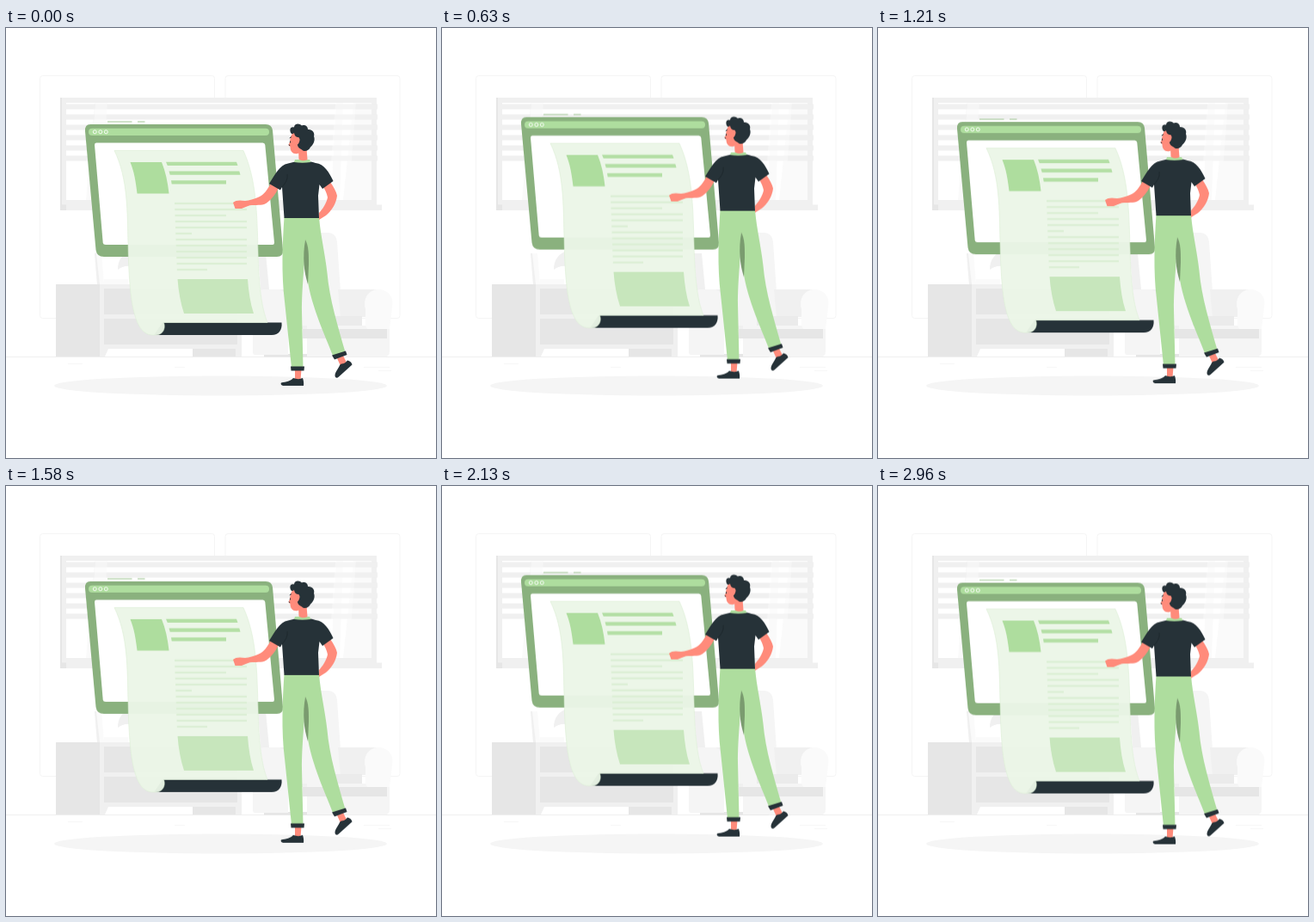
Animation of 500 by 500 pixels, one loop 3 s. Source, as an HTML page:

```html
<!DOCTYPE html>
<html lang="en">
<head>
<meta charset="utf-8">
<title>Reading a long page</title>
<style>
  html, body { margin: 0; width: 100%; height: 100%; overflow: hidden; background: #fff; }
  svg { display: block; width: 100vw; height: 100vh; }

  /* Linear bob, drawn at 24 pictures per second */
  .float { animation: bob 1500ms -4ms infinite; }
  @keyframes bob {
    0%   { transform: translateY(.5px); animation-timing-function: steps(18, start); }
    50%  { transform: translateY(-9.5px); animation-timing-function: steps(18, start); }
    100% { transform: translateY(.5px); }
  }

  .g1 { fill: #fafafa; }
  .g2 { fill: #f5f5f5; }
  .g3 { fill: #f0f0f0; }
  .g4 { fill: #e6e6e6; }
  .white { fill: #fff; }
  .green { fill: #aedd9e; }
  .title { fill: #b4dfa5; }
  .deep { fill: #8ab17e; }
  .shade { fill: #7a9b6f; }
  .ink { fill: #263238; }
  .skin { fill: #ff8b7b; }
  .line { fill: none; stroke: #f5f5f5; }
</style>
</head>
<body>
<svg viewBox="0 0 500 500">
  <!-- wall -->
  <g class="line">
    <rect x="39.5" y="55.5" width="203" height="282" rx="3"/>
    <rect x="255" y="55.5" width="203" height="282" rx="3"/>
  </g>

  <!-- window -->
  <g>
    <path class="white" d="M63 81H431V212H63Z"/>
    <path class="g1" d="M103 87H118L108 200H93ZM384 87H392L388 200H378ZM404 87H425V200H392Z"/>
    <path class="g3" d="M63 81H431V87H63ZM65 87H70V206H65ZM425 87H431V206H425ZM70 200H425V206H70ZM63 205.5H437V212H63Z"/>
    <path class="g4" d="M63 81H65V206H63ZM63 205.5H70V212H63Z"/>
    <g id="slats" class="g3"></g>
    <path d="M104 87H118L113 155H99ZM383 87H407L402 155H378Z" fill="#fff" opacity=".3"/>
  </g>

  <!-- floor -->
  <path d="M0 382.5H500" stroke="#ebebeb" stroke-width=".8"/>
  <path d="M72 390.5H89M196 394.5H208M416 394.5H446M433 398.5H448" stroke="#f5f5f5" stroke-width=".8"/>

  <!-- cabinet -->
  <g>
    <path class="g1" d="M103 262H111L114 298H106ZM114 292H142V298H114Z"/>
    <path class="g3" d="M103 262H105L109 298H106ZM130 281C130 269 136 262 146 259V277C139 276 134 278 130 281ZM293 262H302L306 304H296Z"/>
    <path class="g3" d="M109 298H274V382H109Z"/>
    <path class="g4" d="M58 298H109V382H58ZM114 303H269V333H114ZM114 338H269V368H114ZM217 373H267V382H217Z"/>
    <path class="white" d="M119 373H217V382H115Z"/>
  </g>

  <!-- armchair -->
  <g>
    <path class="g3" d="M296 304H350V350H296Z"/>
    <path class="g2" d="M346 238H374C381 238 384 242 385 249L391 335V346H340V250Z"/>
    <path class="g4" d="M300 379H380V382.5H300Z"/>
    <path class="g3" d="M386 304H434V336H389Z"/>
    <path d="M366 335H414V346H366Z" fill="#ebebeb"/>
    <path class="g2" d="M350 346H446V376Q446 382 441 382H350Z"/>
    <path class="g1" d="M418 346V327C414 312 424 304 433 304C443 304 452 312 449 325L446 350H420Z"/>
    <path class="g4" d="M345 350H443V361H345Z"/>
    <path class="g2" d="M287 318C287 309 293 304 299 304H318C324 306 328 311 328 319V380H290Q287 380 287 377Z"/>
  </g>

  <ellipse class="g2" cx="249.5" cy="416" rx="193.5" ry="11.5"/>

  <g class="float">
    <!-- monitor -->
    <path d="M118 109H146.500M153 109H161.500" stroke="#a2c795" stroke-width="1.1"/>
    <path class="deep" d="M98 112H302Q309 112 310 119L322 258Q322.500 266 315 266H114Q105.500 266 104.500 258L92 120Q91.500 112 98 112Z"/>
    <path class="white" d="M105 133.500H298.500Q301 133.500 301.300 136L312 249.500Q312 252 310 252H116Q113 252 112.700 249.500L103 136Q102.800 133.500 105 133.500Z"/>
    <rect class="green" x="96" y="116.800" width="210" height="8.200" rx="4.100"/>
    <g fill="none" stroke="#fff" stroke-width=".9">
      <circle cx="103.300" cy="120.800" r="2"/>
      <circle cx="109.800" cy="120.800" r="2"/>
      <circle cx="116.300" cy="120.800" r="2"/>
    </g>

    <!-- scroll of paper -->
    <path class="ink" d="M182 342.500H320.500C321.500 351 317 357 309 357H172Z"/>
    <path d="M126 142.500H276C291 175 292 215 293 260C294 300 297 325 304 342.500H183.500C186 350 182 357 174 357H170C147 356 143 310 142 250C141 215 142 175 126 142.500Z"
          fill="#ecf6e8" fill-opacity=".96" stroke="#dceed5" stroke-width=".6"/>
    <path class="green" d="M144.500 156H181C185.500 167 188 179 189.500 192.500H152.500C151 179 149 167 144.500 156Z"/>
    <path class="title" d="M186 155.800H268L269.500 160H187.800ZM189.500 166.500H271.300L272.500 170.700H190.700ZM192 177.200H256V181.400H192.700Z"/>
    <g id="copy" fill="#dcefd5"></g>
    <path d="M199.500 292H281C282 306 284 320 288 332H207C203 320 200.500 306 199.500 292Z" fill="#c7e6bc"/>

    <!-- reader: legs -->
    <path class="skin" d="M336 397H343.500L342.500 409H336ZM385 384L392 381L396 389L389 393Z"/>
    <path class="ink" d="M320 412.500C326 411.500 331 410.500 334 407C338 408.500 342 408.500 345 407C346 410 346.500 413 346 416H323C320 416 319 413.500 320 412.500Z"/>
    <path class="ink" d="M383 406C381.500 403 384 399 386 396C388 393 388 391 390 390.500C393 390.500 395 389 397 386.500C400 387 402 389 402.500 391.500L387 405.500C385.500 407 384 407 383 406Z"/>
    <path class="green" d="M323.500 220H364C366 243 371 262 373.500 285C376 315 386 347 394.500 377L380.500 382C371 357 352 318 349.500 283L348 246C347 282 344 300 344 330L345.500 395H332L324 318C320 285 321.500 250 323.500 220Z"/>
    <path class="shade" d="M348 246C352 254 352 262 352 275L351 298C346.500 283 344.500 268 348 246Z"/>
    <path class="ink" d="M331 393.500H347L346.500 398.500H331.500ZM379 380.500L395 375.500L396.500 380L382 385.500Z"/>

    <!-- reader: arms and body -->
    <path class="skin" d="M369 185L377 179C381 185 384 190 385 195C384 204 379 212 372 218L364 223V215C368 211 373 203 374 197C373 192 371 188 369 185Z"/>
    <path class="skin" d="M309 179C303 189 301 193 294 196.500C288 199 283 200.500 278 201C272 200 267 200 264 203L266.500 210H274C279 208 283 206 286 206C293 206 300 206 303 203.500C309 199 313 194 317 186Z"/>
    <path class="ink" d="M336 155.500C345 154 354 155 360 157C370 158 376 168 380.500 178L368 187L364.500 182L363 195L364 221H323.500L321 185L319 188.500L306 181C312 172 318 159 328 157.500Z"/>
    <path d="M327 170C328 177 324 181 321 185" fill="none" stroke="#1c262b" stroke-width=".8"/>

    <!-- reader: head -->
    <path class="green" d="M335 156L336 153H353L354.500 156C348 157 341 157 335 156Z"/>
    <path class="skin" d="M340 140H349.500L350.500 153C347 155 343 154.500 340.500 152.500Z"/>
    <path class="skin" d="M335 120C331 124 330.500 129 330 132L328.500 136.500L330.500 138C330.500 144 334 147 339 146L345 144L350 137L346 122Z"/>
    <path class="ink" d="M331.500 122.500C329 118 331 114 335 115.500C335 111 341 110 344 113.500C348 112 351 114.500 351 118C356 117.500 359.500 121.500 358 126C360 131 357 136 354 138.500C352 143 347 144.500 344 141.500C340.500 140 338 137 339 133L340.500 127C337 127 335.500 125 335 122C334 123 333 123.500 331.500 122.500Z"/>
    <ellipse class="skin" cx="338.500" cy="131.500" rx="2.700" ry="4.500" transform="rotate(18 338.500 131.500)"/>
    <path d="M329.800 128L332 126.500M330.500 131.500V133.500M329 135.500L330 137" fill="none" stroke="#263238" stroke-width="1"/>
  </g>
</svg>
<script>
  const addBar = (id, x, y, width, height) => {
    const bar = document.createElementNS("http://www.w3.org/2000/svg", "rect");
    Object.entries({ x, y, width, height }).forEach(([key, value]) => bar.setAttribute(key, value));
    document.getElementById(id).append(bar);
  };

  for (let i = 0; i < 6; i++) addBar("slats", 68, 88.5 + i * 12, 364, 6);

  // Right ends of the short closing lines of each paragraph
  const shortEnds = { 2: 256, 5: 216, 11: 234 };
  for (let i = 0; i < 12; i++) {
    const left = 196 + i * 0.25;
    addBar("copy", left, 202.8 + i * 7, (shortEnds[i] || 280) - left, 2.4);
  }
</script>
</body>
</html>
```
